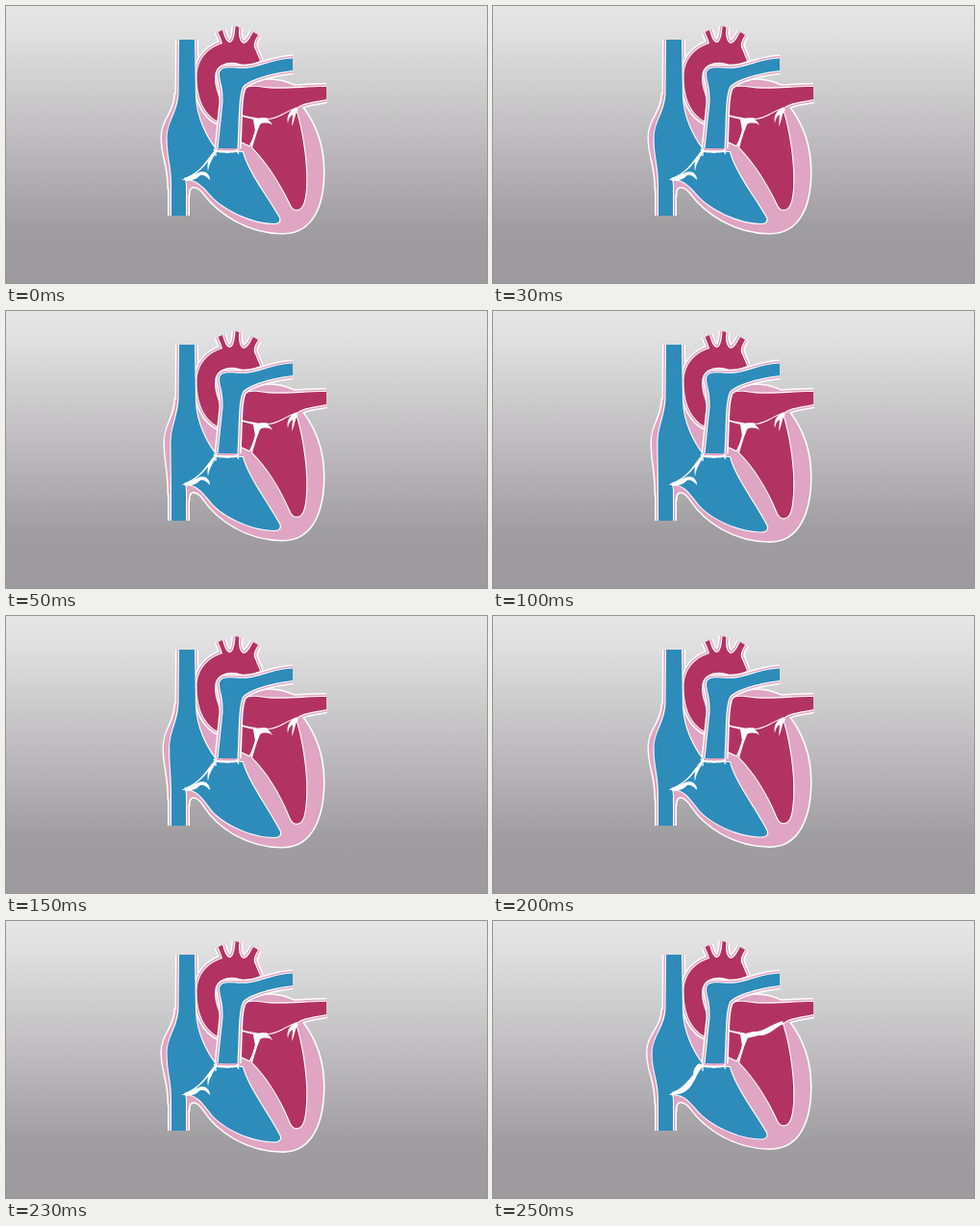
An HTML page with a canvas that plays this animation: 500 px wide and 288 px high, repeating every 300 ms.

```html
<!DOCTYPE html>
<html lang="en">
<head>
<meta charset="utf-8">
<title>Beating heart</title>
<style>
html, body { margin: 0; width: 100%; height: 100%; overflow: hidden; }
canvas { display: block; width: 500px; height: 288px; }
</style>
</head>
<body>
<canvas id="stage" width="500" height="288"></canvas>
<script>
const ctx = document.getElementById('stage').getContext('2d');
const BLUE = '#2e8cba', RED = '#b23361', PINK = '#dfa5c2', WHITE = '#fff';
const STEP = 50;

// One value per step of the beat
const apexY = [236, 238, 239.4, 240, 239.4, 236.4];
const atriumX = [162, 165, 165, 164, 162, 160.5];

const backdrop = ctx.createLinearGradient(0, 0, 0, 288);
[[0, '#e6e6e6'], [.1, '#e0e0e0'], [.27, '#d1d0d1'], [.52, '#bab8ba'], [.8, '#a09da0'], [1, '#9e9a9d']]
  .forEach(([at, color]) => backdrop.addColorStop(at, color));

function line(d, color, width) {
  ctx.strokeStyle = color;
  ctx.lineWidth = width;
  ctx.stroke(new Path2D(d));
}

function fill(d, color) {
  ctx.fillStyle = color;
  ctx.fill(new Path2D(d));
}

// Gaps in the outline are open vessel ends; the filling spans them
function cavity(d, color) {
  line(d, WHITE, 2.2);
  fill(d.replace(/(?!^)M/g, 'L'), color);
}

function vessel(d, color) {
  line(d, WHITE, 8);
  line(d, PINK, 5);
  cavity(d, color);
}

const aorta = `M223,121 C207,115 198.5,97 198.5,74 C198.5,56 209,44 225,39
  C224,35 222,31 220.5,27 M225,25 C227,32 229,38 233,38 C237,37 238,28 238.5,21
  M242.5,22 C241,30 243,38 247,39 C252,38 254,32 257,27
  M262,30 C259,35 256,40 259,45 L264,57
  M250,63 C240,57 222,56 217.5,70 C215.5,84 221,90 223,102`;

const trunk = `M298,54.5 C280,55 267,62 255,64 C240,67 224,60 222,70
  C222,79 226,82 225.5,100 L220.5,148 M240.5,148
  C242.5,115 241,96 246,84 C254,75 280,69 298,67`;

const leftAtrium = `M333,97 C320,100 309,100 302,106 C291,110 284,118 275,118 L263,117
  C256,115 248,115 240,111 L240,98 C245,84 252,83 262,84 C285,88 305,84 333,84`;

const aorticRoot = 'M240,113 C248,116 255,117 261,119 C260,130 257,138 253,145 L240,139 Z';

function valves(open) {
  // Pulmonary
  line('M216,149 C222,154 225,150 230,152 C234,150 237,154 242,149', WHITE, 2);
  line('M218,151 L218,156 M240,151 L242,154', WHITE, 1.3);
  // Aortic
  fill('M257,118 L272,116 L265,121 L261,131 L256,147 L254,144 L259,130 Z', WHITE);
  if (open) {
    fill('M217,150 C212,156 208,162 210,172 C211,164 214,160 219,151 Z', WHITE);
    fill('M186,179 C195,178 199,170 208,173 C211,176 212,177 212,181 C208,176 204,175 202,176 C198,180 195,181 187,182 Z', WHITE);
    fill('M302,105 C296,108 291,113 293,122 C294,116 296,114 298,113 L297,125 C301,118 300,111 304,108 Z', WHITE);
    fill('M261,117 C268,115 274,117 277,124 C273,121 268,121 264,123 Z', WHITE);
  } else {
    fill('M214,148 C210,151 208,155 208,160 C202,166 197,175 186,178 L187,181 C198,180 204,176 208,168 C212,162 213,155 219,151 Z', WHITE);
    fill('M259,118 L270,115 C281,116 289,107 301,104 L302,107 C294,110 287,120 276,119 L264,122 Z', WHITE);
  }
}

function draw(step) {
  const b = apexY[step], a = atriumX[step];
  const drop = b - 236;
  const inner = a + 5 + (a - 160) * .3;

  const wall = `M176,92 C175,112 ${a},118 ${a},137 C${a},156 169,165 169,190 L190,196
    C190,184 200,187 206,${195 + drop * .6}
    C220,${214 + drop * 1.3} 250,${b} 288,${b}
    C319,${b} 330,207 330,172 C330,140 318,118 307,104 L300,83
    C285,76 272,75 260,79 L245,86 L225,115 L215,118 L200,95 Z`;

  const rightAtrium = `M180,35 L179.5,92 C178,112 ${inner},120 ${inner},138
    C${inner},157 172,165 172,185 L172,218 M187,218 L187,187 Q187,182 185,179
    C200,175 207,162 218,149 C207,135 198,115 197,95 L196,35`;

  const rightVentricle = `M187,180 C201,174 209,164 218,151 L246,152
    C252,174 272,199 ${284 + drop * .2},${220 + drop}
    Q${286 + drop * .2},${225.5 + drop} 279,${226 + drop}
    C255,${226 + drop} 226,${211 + drop * 1.3} 214,${198 + drop}
    C205,${188 + drop * .6} 200,181 187,180 Z`;

  const leftVentricle = `M262,120 L271,118 C284,118 290,110 301,107
    C307,125 314,163 312,190 Q311,${203 + drop} 308,${208 + drop}
    C304,${214 + drop} 298,${213 + drop} 295,${205 + drop}
    C285,184 271,162 256,147 Z`;

  ctx.fillStyle = backdrop;
  ctx.fillRect(0, 0, 500, 288);

  line(wall, WHITE, 3);
  for (const d of [rightAtrium, leftAtrium]) line(d, WHITE, 8);
  fill(wall, PINK);
  for (const d of [rightAtrium, leftAtrium]) line(d, PINK, 5);

  cavity(aorticRoot, RED);
  cavity(leftAtrium, RED);
  cavity(leftVentricle, RED);
  vessel(aorta, RED);
  cavity(rightAtrium, BLUE);
  cavity(rightVentricle, BLUE);
  vessel(trunk, BLUE);
  valves(step < 5);
}

function tick() {
  draw(Math.floor(performance.now() / STEP) % apexY.length);
  requestAnimationFrame(tick);
}
tick();
</script>
</body>
</html>
```
